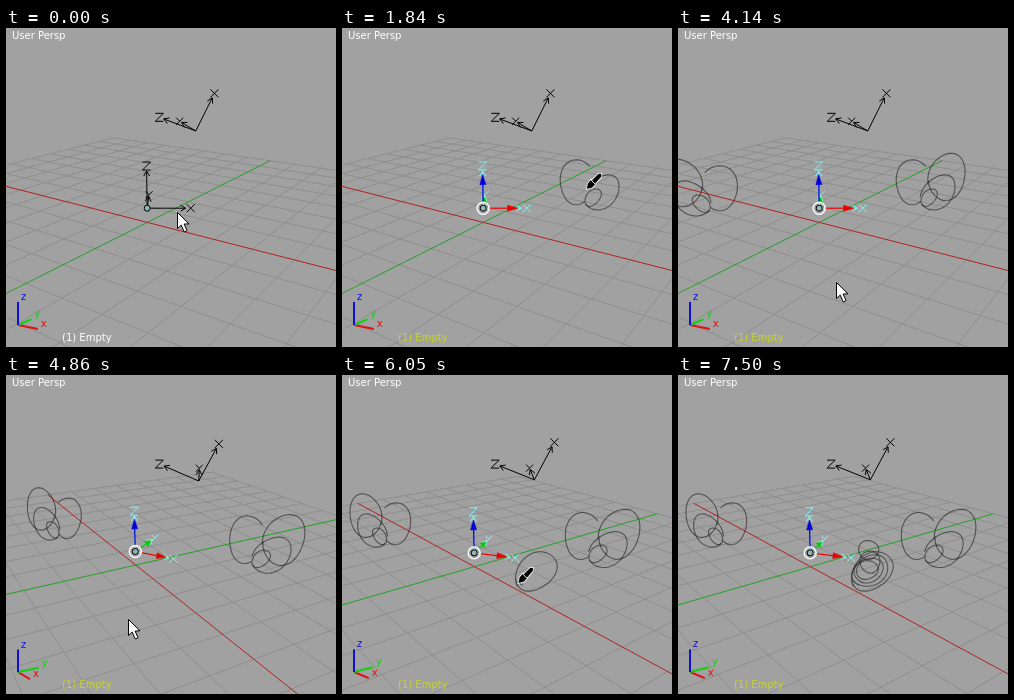
An HTML page with a canvas for the animation above (8000 ms loop, 330x319 px).

```html
<!DOCTYPE html>
<html lang="en">
<head>
<meta charset="utf-8">
<title>Sketching in a 3D viewport</title>
<style>
html, body { margin: 0; width: 100%; height: 100%; overflow: hidden; background: #a1a1a1; }
canvas { display: block; }
</style>
</head>
<body>
<canvas id="view" width="330" height="319"></canvas>
<script>
const ctx = document.getElementById('view').getContext('2d');
const W = 330, H = 319, LOOP = 8000, RAD = Math.PI / 180;
const FOCAL = 490, DISTANCE = 13.5, HEADING = 34.16 * RAD;

// Orbit camera around a fixed pivot. World points are [right, forward, up]
// from the pivot, as seen with no turn.
const orbit = (turn, tilt) => ({ turn: turn * RAD, tilt: tilt * RAD });
const START = orbit(0, 17.23), TURNED = orbit(25.8, 20.4), SETTLED = orbit(17.9, 19.1);

const NEAR = { at: [-.618, -.91, -.28], axes: [[1.13, 0, 0], [0, 1.13, 0], [0, 0, 1.13]] };
const FAR = { at: [.674, .29, 1.52], axes: [[.49, .1, 1], [-.42, 1.04, .09], [-.98, -.36, .43]] };

const clamp = x => Math.max(0, Math.min(1, x));
const mix = (a, b, u) => a + (b - a) * u;
const mixPoint = (p, q, u) => p.map((v, i) => mix(v, q[i], u));
const add = (p, q) => p.map((v, i) => v + q[i]);
const ramp = (t, a, b) => clamp((t - a) / (b - a));
const ease = u => u * u * (3 - 2 * u);
const spin = (x, y, a) => [x * Math.cos(a) - y * Math.sin(a), x * Math.sin(a) + y * Math.cos(a)];

// world to camera: [right, up, depth]
function toCamera([r, g, z], { turn, tilt }) {
  const [x, forward] = spin(r, g, -turn);
  const [depth, up] = spin(forward, z, tilt);
  return [x, up, depth];
}

function project(p, cam) {
  const [x, y, d] = toCamera(p, cam), scale = FOCAL / (DISTANCE + d);
  return [W / 2 + x * scale, H / 2 - y * scale];
}

// screen point back to a plane that faces the camera at this depth from the pivot
function unproject([sx, sy], { turn, tilt }, depth) {
  const scale = (DISTANCE + depth) / FOCAL;
  const [forward, z] = spin(depth, (H / 2 - sy) * scale, -tilt);
  return [...spin((sx - W / 2) * scale, forward, turn), z];
}

function cameraAt(t) {
  const [a, b, u] = t < 4900 ? [START, TURNED, ramp(t, 4140, 4860)]
                             : [TURNED, SETTLED, ramp(t, 4900, 5400)];
  return { turn: mix(a.turn, b.turn, ease(u)), tilt: mix(a.tilt, b.tilt, ease(u)) };
}

const captureTime = t => t < 4140 ? Math.floor((t + 2) / 91.3) * 91.3
                                  : 4140 + Math.floor((t - 4132) / 91) * 91;

// ---- pen strokes: slightly uneven ellipses in screen space ----

const ring = (cx, cy, rx, ry, tilt, from, sweep = 370) => ({ cx, cy, rx, ry, tilt, from, sweep });

// spread strokes evenly over a time span, with short pauses
function schedule(strokes, begin, end) {
  const slot = (end - begin) / strokes.length;
  strokes.forEach((s, i) => {
    s.begin = begin + i * slot;
    s.end = s.begin + slot * .9;
  });
  return strokes;
}

function strokePoint(s, u) {
  const a = (s.from + s.sweep * u) * RAD;
  const r = 1 + .03 * Math.sin(3 * a + s.cx) - .03 * (u - .5);
  const [x, y] = spin(s.rx * r * Math.cos(a), s.ry * r * Math.sin(a), s.tilt * RAD);
  return [s.cx + x, s.cy + y];
}

const RIGHT = [
  ...schedule([
    ring(235, 154, 17, 22.5, 0, -42, -255),
    ring(251, 169.5, 10, 6.5, -50, 180),
    ring(260, 164.5, 20, 14.5, -45, 190, -330)
  ], 950, 1880),
  ...schedule([ring(269, 149, 18, 24, 15, 150)], 1900, 2520)
];

// the left sketch mirrors the right one
const mirror = ([x, y]) => [41 - (x - 235) * 1.1, y + 6];

const MIDDLE = [
  ...schedule([0, 1, 2, 3].map(i =>
    ring(194 - 1.6 * i, 196.5 - .5 * i, 23 - 4 * i, 17 - 2.6 * i, -40 + 8 * i, 180 - 25 * i, 385)
  ), 5790, 6790),
  ...schedule([ring(190.5, 175, 10, 9.5, 0, 165), ring(192, 187, 10, 11, 0, 200)], 6790, 7370)
];

function drawSketch(strokes, t, place) {
  for (const s of strokes) {
    if (t < s.begin) continue;
    const done = ramp(t, s.begin, s.end), points = [];
    for (let i = 0; i <= 48; i++) points.push(place(strokePoint(s, done * i / 48)));
    path(points, 'rgba(25,25,25,.58)', 1.1);
  }
}

function brushPoint(strokes, t) {
  const i = Math.max(0, strokes.findLastIndex(s => t >= s.begin));
  const s = strokes[i], next = strokes[i + 1];
  const p = strokePoint(s, ramp(t, s.begin, s.end));
  return next ? mixPoint(p, strokePoint(next, 0), ramp(t, s.end, next.begin)) : p;
}

// ---- drawing helpers ----

function path(points, color, width = 1) {
  ctx.beginPath();
  points.forEach(([x, y]) => ctx.lineTo(x, y));
  ctx.strokeStyle = color;
  ctx.lineWidth = width;
  ctx.stroke();
}

function shape(points, fill, edge = fill, width = .5) {
  ctx.beginPath();
  points.forEach(([x, y]) => ctx.lineTo(x, y));
  ctx.closePath();
  ctx.fillStyle = fill;
  ctx.fill();
  ctx.strokeStyle = edge;
  ctx.lineWidth = width;
  ctx.stroke();
}

function disc([x, y], r, fill, edge, width = 1) {
  ctx.beginPath();
  ctx.arc(x, y, r, 0, 7);
  ctx.fillStyle = fill;
  ctx.fill();
  ctx.strokeStyle = edge;
  ctx.lineWidth = width;
  ctx.stroke();
}

function text(str, x, y, color) {
  ctx.font = '10px "DejaVu Sans", sans-serif';
  ctx.fillStyle = color;
  ctx.fillText(str, x, y);
}

function arrowHead(tip, dir, len, half) {
  return [half, 0, -half].map(k => add(tip, k ? spin(-len, k, dir) : [0, 0]));
}

// ---- scene ----

function floorPoint(x, y) {
  return [...spin(x, y - 1.1, -HEADING), -.675];
}

function drawFloor(cam) {
  const line = (i, alongY, color) => path([-8, 8].map(k =>
    project(alongY ? floorPoint(i, k) : floorPoint(k, i), cam)), color);
  for (let i = -8; i <= 8; i++) {
    if (!i) continue;
    line(i, true, '#8e8e8e');
    line(i, false, '#8e8e8e');
  }
  line(0, true, '#25a025');
  line(0, false, '#b02222');
}

function drawCorner(cam) {
  const base = [12, 297], colors = ['#e01010', '#10d010', '#1010d8'];
  const dirs = [[...spin(1, 0, -HEADING), 0], [...spin(0, 1, -HEADING), 0], [0, 0, 1]];
  dirs.forEach((dir, i) => {
    const [x, y] = toCamera(dir, cam), tip = add(base, [24 * x, -24 * y]);
    path([base, tip], colors[i], 2);
    text('xyz'[i], tip[0] + 3, tip[1] - 2, colors[i]);
  });
}

// axis letters are made of plain lines
function letter(i, x, y, color) {
  const r = i === 1 ? 3.5 : 4;
  if (i === 2) {
    path([[x - r, y - r], [x + r, y - r], [x - r, y + r], [x + r, y + r]], color);
  } else {
    path([[x + r, y - r], [x - r, y + r]], color);
    path([[x - r, y - r], i ? [x, y] : [x + r, y + r]], color);
  }
}

function drawEmpty(empty, cam, color, gizmo) {
  const base = project(empty.at, cam);
  const ends = empty.axes.map(axis => project(add(empty.at, axis), cam));
  const dirs = ends.map(([x, y]) => Math.atan2(y - base[1], x - base[0]));
  ends.forEach((end, i) => {
    const tip = mixPoint(base, end, .88);
    path([base, tip], color);
    path(arrowHead(tip, dirs[i], 5, 3), color);
    letter(i, ...end, color);
  });
  if (!gizmo) return;
  ends.forEach((end, i) => {
    const paint = ['#e80000', '#00d000', '#0000dc'][i];
    const len = Math.hypot(end[0] - base[0], end[1] - base[1]);
    const tip = mixPoint(base, end, .8);
    path([add(base, spin(6, 0, dirs[i])), mixPoint(base, end, .7)], paint, 1.3);
    shape(arrowHead(tip, dirs[i], Math.max(5, len * .24), 3), paint);
  });
  disc(base, 6, 'transparent', '#fff', 1.4);
}

function drawArrow(p) {
  const outline = [[0, 0], [0, 16], [3.7, 12.6], [6.8, 19.5], [9.6, 18.2], [6.6, 11.6], [11.5, 11.3]];
  shape(outline.map(q => add(q, add(p, [.5, .5]))), '#fff', '#000', 1);
}

function drawBrush([x, y]) {
  const at = points => points.map(([a, b]) => [x + a, y - b]);
  const parts = [
    at([[0, 0], [1, 5], [4, 8.5], [8, 4.5], [5, 1]]),
    at([[5, 8], [11.5, 14.5], [14, 14.5], [14, 12], [8, 5]])
  ];
  parts.forEach(p => shape(p, '#fff', '#fff', 2));
  parts.forEach(p => shape(p, '#000'));
  path(at([[4, 8.5], [8, 4.5]]), '#ddd');
}

function drawPointer(t) {
  const glide = (from, to, a, b) => mixPoint(from, to, ease(ramp(t, a, b)));
  if (t < 350) drawArrow(glide([171, 184], [150, 181], 80, 270));
  else if (t < 900) drawArrow(glide([150, 181], [250, 140], 350, 830));
  else if (t < 2560) drawBrush(brushPoint(RIGHT, t));
  else if (t < 2645) drawBrush([179, 208]);
  else if (t < 4140) return;
  else if (t < 4900) drawArrow(glide([158, 254], [122, 244], 4140, 4860));
  else if (t < 5450) drawArrow(glide([122, 244], [183, 219], 4950, 5400));
  else if (t < 5780) drawArrow(glide([183, 219], [174, 192], 5450, 5690));
  else if (t < 7410) drawBrush(brushPoint(MIDDLE, t));
  else if (t < 7495) drawBrush([131, 205]);
}

function draw(t) {
  const cam = cameraAt(t), selected = t >= 270;
  ctx.fillStyle = '#a1a1a1';
  ctx.fillRect(0, 0, W, H);
  drawFloor(cam);
  drawEmpty(FAR, cam, '#000');
  drawEmpty(NEAR, cam, selected ? '#8cf0f0' : '#000', selected);
  disc(project(NEAR.at, cam), 3, '#8fb5b5', '#000');

  const onPlane = (p, depth) => project(unproject(p, START, depth), cam);
  drawSketch(RIGHT, t, p => onPlane(p, .5));
  if (t >= 3575) drawSketch(RIGHT, t, p => onPlane(mirror(p), -.2));
  drawSketch(MIDDLE, t, p => p);

  drawCorner(cam);
  text('User Persp', 6, 11, '#fff');
  text('(1) Empty', 56, 313, t < 1000 ? '#fff' : '#c6d42c');
  drawPointer(t);
}

function tick(now) {
  draw(captureTime(Math.max(0, now % LOOP)));
  requestAnimationFrame(tick);
}
requestAnimationFrame(tick);
</script>
</body>
</html>
```
